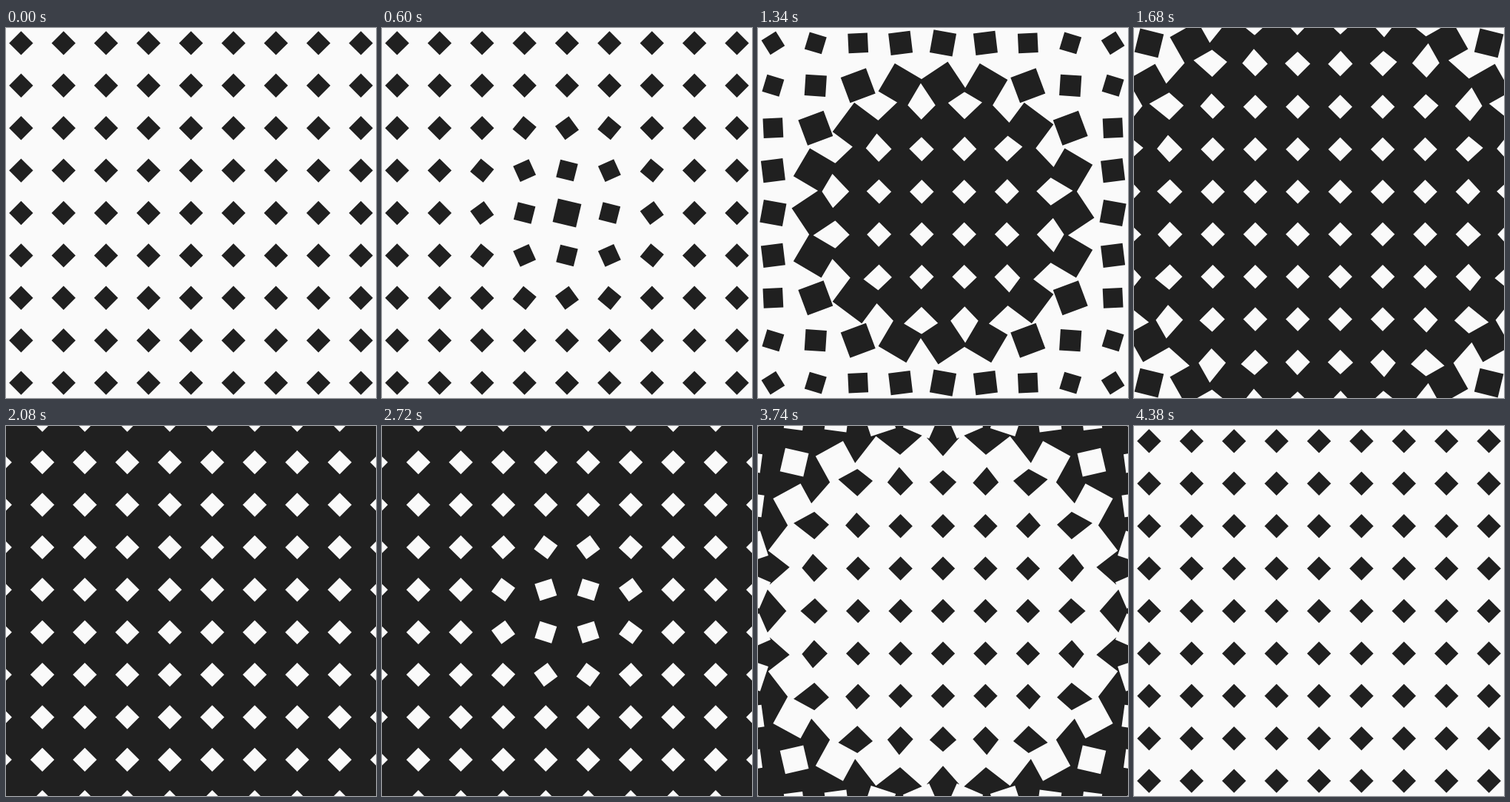
Recreate the animation shown at these times as an HTML page with a canvas. Size 500 by 500 pixels, loop 4.4 s.

```html
<!DOCTYPE html>
<html lang="en">
<head>
<meta charset="utf-8">
<title>Diamond ripple</title>
<style>
  html, body { margin: 0; width: 100%; height: 100%; overflow: hidden; background: #fafafa; }
  canvas { display: block; width: 500px; height: 500px; }
</style>
</head>
<body>
<canvas id="stage" width="500" height="500"></canvas>
<script>
const ctx = document.getElementById('stage').getContext('2d');
const DARK = '#202020', LIGHT = '#fafafa';
const SIZE = 500, STEP = 57.4;
const SMALL = 16.2, LARGE = STEP - SMALL;   // half diagonals
const HALF_LOOP = 2200, START = 25, SPREAD = 190, TURN = 970;

const ease = u => {
  const v = Math.min(1, Math.max(0, u));
  return (1 - Math.cos(Math.PI * v)) / 2;
};

function addSquare(x, y, radius, angle) {
  for (let k = 0; k < 4; k++) {
    const a = angle + k * Math.PI / 2;
    const px = x + radius * Math.cos(a), py = y + radius * Math.sin(a);
    if (k) ctx.lineTo(px, py);
    else ctx.moveTo(px, py);
  }
  ctx.closePath();
}

// A ripple turns and grows the squares until their gaps form the next grid.
function drawGrid(count, time, back, front) {
  const mid = (count - 1) / 2;
  ctx.fillStyle = back;
  ctx.fillRect(0, 0, SIZE, SIZE);
  ctx.beginPath();
  for (let row = 0; row < count; row++) {
    for (let col = 0; col < count; col++) {
      const i = col - mid, j = row - mid;
      const p = ease((time - START - SPREAD * Math.hypot(i, j)) / TURN);
      const dir = (row + col) % 2 ? -1 : 1;
      const radius = SMALL + (LARGE - SMALL) * p ** 3;
      addSquare(SIZE / 2 + i * STEP, SIZE / 2 + j * STEP, radius, dir * p * Math.PI / 2);
    }
  }
  ctx.fillStyle = front;
  ctx.fill();
}

const begin = performance.now();
function frame() {
  const t = (performance.now() - begin) % (2 * HALF_LOOP);
  if (t < HALF_LOOP) drawGrid(9, t, LIGHT, DARK);
  else drawGrid(10, t - HALF_LOOP, DARK, LIGHT);
  requestAnimationFrame(frame);
}
frame();
</script>
</body>
</html>
```
